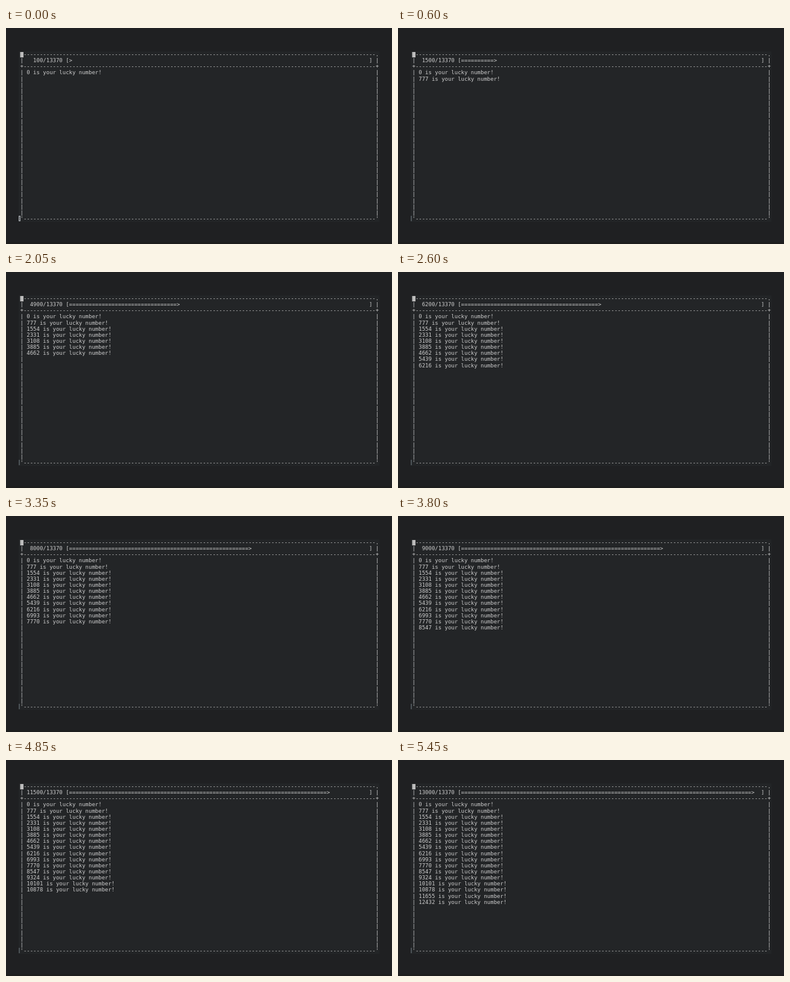
Animation, 640 px wide and 360 px high, one loop 5.5 s. Source, as an HTML page with a canvas:

```html
<!DOCTYPE html>
<html lang="en">
<head>
<meta charset="utf-8">
<title>Lucky numbers</title>
<style>
  html, body { margin: 0; width: 100%; height: 100%; overflow: hidden; background: #1f2022; }
  canvas { display: block; }
</style>
</head>
<body>
<canvas id="stage" width="640" height="360"></canvas>
<script>
const ctx = document.getElementById('stage').getContext('2d');
const LOOP = 5500, TICK = 50, MS_PER_HUNDRED = 42.245;
const TOTAL = 13370, LUCKY = 777;
const COLS = 110, ROWS = 28, BAR = 92;
const LEFT = 23.5, BASELINE = 46.9, CELL_W = 5.406, CELL_H = 10.15;

function print(text, row, col = 0) {
  [...text].forEach((char, i) => {
    if (char !== ' ') ctx.fillText(char, LEFT + (col + i) * CELL_W, BASELINE + row * CELL_H);
  });
}

function rect(color, x, y, w, h) {
  ctx.fillStyle = color;
  ctx.fillRect(x, y, w, h);
}

function drawFrame() {
  const rule = '-'.repeat(COLS - 2);
  print(rule + '.', 0, 1);
  print('+' + rule + '+', 2);
  print("'" + rule + "'", ROWS - 1);
  for (let row = 1; row < ROWS - 1; row++) {
    if (row === 2) continue;
    print('|', row);
    print('|', row, COLS - 1);
  }
}

function draw(time) {
  const elapsed = time < 2 * TICK ? 0 : Math.floor(time / TICK) * TICK;
  const progress = 100 + 100 * elapsed / MS_PER_HUNDRED;
  const count = Math.floor(progress / 100) * 100;
  const filled = Math.floor(count / TOTAL * BAR);

  rect('#1f2022', 0, 0, 640, 360);
  rect('#232527', 21, 39, 598, 284);
  rect('#1d1d1d', 0, 357, 640, 3);

  ctx.font = '8.98px "DejaVu Sans Mono", monospace';
  ctx.fillStyle = '#cdcdcd';
  drawFrame();
  const bar = ('='.repeat(filled) + '>').padEnd(BAR);
  print(`${String(count).padStart(5)}/${TOTAL} [${bar}]`, 1, 2);
  for (let n = 0; n <= progress; n += LUCKY) {
    print(`${n} is your lucky number!`, 3 + n / LUCKY, 2);
  }

  // Block cursor and the pointer at the lower left
  rect('#bcbcbc', 23.5, 40, 5.5, 9);
  rect('#77818a', 21.5, 313, 1, 9);
  if (!elapsed) {
    rect('#b5b9bd', 21, 313, 3, 9);
    rect('#303338', 22, 314, 1, 7);
  }
}

function tick() {
  draw(performance.now() % LOOP);
  requestAnimationFrame(tick);
}
tick();
</script>
</body>
</html>
```
